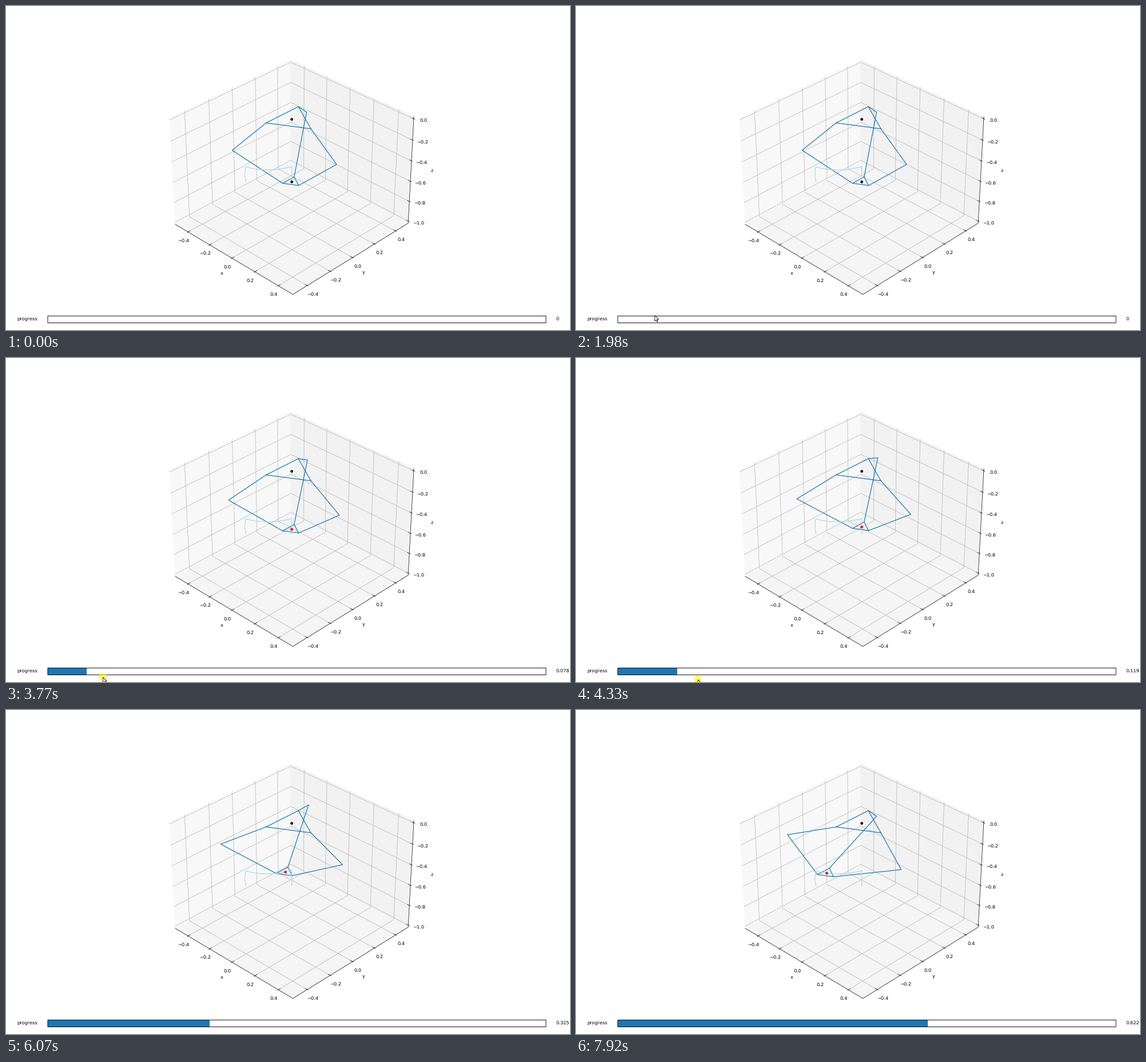
Write a matplotlib script that moves like this. It is 986 px wide and 568 px high and loops after 8 s.

```python
import numpy as np
import matplotlib.pyplot as plt
from matplotlib.animation import FuncAnimation
from matplotlib.patches import Circle, Polygon, Rectangle

W, H, DPI = 986, 568, 64
STEP, LOOP = 40, 8000
BLUE, GRID, DARK, RED = "#1f77b4", "#b0b0b0", "#170408", "#d81c1c"
PT = 72 / DPI          # points per pixel
THIN, THICK, FONT = 0.68 * PT, 1.24 * PT, 8.3 * PT

plt.rcParams["font.family"] = "DejaVu Sans"
plt.rcParams["text.hinting"] = "none"

fig = plt.figure(figsize=(W / DPI, H / DPI), dpi=DPI, facecolor="white")
ax = fig.add_axes([0, 0, 1, 1])
ax.set_xlim(0, W)
ax.set_ylim(H, 0)
ax.axis("off")

# ---- camera ----
AZIM, ELEV = np.radians([-45.5, 32.35])
BOX = np.array([8 / 7, 8 / 7, 6 / 7])
CENTRE = np.array([0, 0, -0.5])
ORIGIN_X, ORIGIN_Y, ZOOM, DIST = 499.6, 290.5, 2477, 10


def project(points):
    """Stage pixels of world points, one point per row."""
    x, y, z = ((np.asarray(points, float) - CENTRE) * BOX).T
    right = -np.sin(AZIM) * x + np.cos(AZIM) * y
    near = np.cos(AZIM) * x + np.sin(AZIM) * y
    up = z * np.cos(ELEV) - near * np.sin(ELEV)
    depth = DIST - near * np.cos(ELEV) - z * np.sin(ELEV)
    return np.column_stack([ORIGIN_X + ZOOM * right / depth,
                            ORIGIN_Y - ZOOM * up / depth])


def line3d(points, color, width, **style):
    return ax.plot(*project(points).T, color=color, lw=width, **style)[0]


def label(x, y, text, ha="center"):
    return ax.text(x, y, text, ha=ha, va="center", size=FONT, color="black", zorder=6)


# ---- box with grid, ticks and labels ----
PAD = 1 / 48
LO, HI = -0.5 - PAD, 0.5 + PAD
BOTTOM, TOP = -1 - PAD, PAD
TICK_IN, TICK_OUT = 1 / 60, 1 / 120


def draw_pane(corner, side_a, side_b, shade):
    a, b, c = np.array(corner), np.array(side_a), np.array(side_b)
    ax.add_patch(Polygon(project([a, b, b + c - a, c]), fc=shade, ec=shade, lw=THIN, zorder=0))


def draw_tick(edge, inward, offset, value):
    edge, inward = np.array(edge), np.array(inward)
    line3d([edge + TICK_IN * inward, edge - TICK_OUT * inward], "black", THIN, zorder=2)
    x, y = project([edge])[0] + offset
    label(x, y, f"{value:.1f}".replace("-", "\u2212"))


def draw_box():
    back, left, right = (LO, HI, BOTTOM), (LO, LO, BOTTOM), (HI, HI, BOTTOM)
    back_top = (LO, HI, TOP)
    draw_pane(back, left, back_top, "#f8f8f8")
    draw_pane(back, right, back_top, "#f2f2f2")
    draw_pane(back, left, right, "#f5f5f5")

    for v in np.linspace(-0.4, 0.4, 5).round(1) + 0.0:
        line3d([(v, LO, BOTTOM), (v, HI, BOTTOM), (v, HI, TOP)], GRID, THIN, zorder=1)
        line3d([(HI, v, BOTTOM), (LO, v, BOTTOM), (LO, v, TOP)], GRID, THIN, zorder=1)
        draw_tick((v, LO, BOTTOM), (0, 1, 0), (-8, 16.4), v)
        draw_tick((HI, v, BOTTOM), (-1, 0, 0), (9.4, 16.4), v)
    for v in np.linspace(-1, 0, 6).round(1):
        line3d([(LO, LO, v), (LO, HI, v), (HI, HI, v)], GRID, THIN, zorder=1)
        draw_tick((HI, HI, v), (-1, 0, 0), (17.5, 4.3), v)

    line3d([left, (HI, LO, BOTTOM), right, (HI, HI, TOP)], "black", THIN, zorder=2)
    label(377, 468.5, "x")
    label(625.5, 467.5, "y")
    label(745, 289, "z")


# ---- delta robot ----
BASE_R, TOOL_R, UPPER, LOWER = 0.16, 0.059, 0.3, 0.5
ARM_ANGLES = np.radians([0, 120, 240])
ARM_DIRS = np.column_stack([np.cos(ARM_ANGLES), np.sin(ARM_ANGLES), np.zeros(3)])
DOWN = np.array([0, 0, -1])


def joint_angles(pos):
    along = ARM_DIRS @ pos
    side2 = pos[0] ** 2 + pos[1] ** 2 - along ** 2
    gap, drop = BASE_R - TOOL_R - along, -pos[2]
    k = (gap ** 2 + side2 + drop ** 2 + UPPER ** 2 - LOWER ** 2) / (2 * UPPER)
    return np.arctan2(gap, drop) + np.arcsin(k / np.hypot(gap, drop))


def upper_arms(theta):
    return UPPER * (np.cos(theta)[:, None] * ARM_DIRS + np.sin(theta)[:, None] * DOWN)


def tool_position(theta):
    """Lower meeting point of three spheres around the shifted elbows."""
    c = (BASE_R - TOOL_R) * ARM_DIRS + upper_arms(theta)
    diff = 2 * (c[1:] - c[0])
    rhs = (c[1:] ** 2).sum(1) - (c[0] ** 2).sum()
    p = np.append(np.linalg.solve(diff[:, :2], rhs), 0)
    d = np.append(np.linalg.solve(diff[:, :2], -diff[:, 2]), 1)
    r = p - c[0]
    qa, qb, qc = d @ d, 2 * d @ r, r @ r - LOWER ** 2
    return p + d * (-qb - np.sqrt(qb ** 2 - 4 * qa * qc)) / (2 * qa)


# pick, lift, carry and place: joints turn evenly between the stops
PICK, PLACE, LIFT = np.array([0, 0, -0.6]), np.array([-0.2, -0.2, -0.6]), np.array([0, 0, 0.15])
STOPS = np.array([PICK, PICK + LIFT, PLACE + LIFT, PLACE])
STOP_JOINTS = np.array([joint_angles(s) for s in STOPS])
LENGTHS = np.linalg.norm(np.diff(STOPS, axis=0), axis=1)
STOP_AT = np.append(0, np.cumsum(LENGTHS)) / LENGTHS.sum()


def joints_at(progress):
    return np.array([np.interp(progress, STOP_AT, j) for j in STOP_JOINTS.T])


draw_box()
base = BASE_R * ARM_DIRS
arms = [line3d(base[:2], BLUE, THICK, zorder=3) for _ in range(3)]
line3d(base[[0, 1, 2, 0]], BLUE, THICK, zorder=3)
tool = line3d(base[[0, 1, 2, 0]], BLUE, THICK, zorder=3)
ax.add_patch(Circle(project([(0, 0, 0)])[0], 2.4, fc=DARK, lw=0, zorder=4))
tool_dot = ax.add_patch(Circle((0, 0), 2.4, lw=0, zorder=4))
samples = np.union1d(np.linspace(0, 1, 80), STOP_AT)
line3d([tool_position(joints_at(s)) for s in samples], "lightblue", THICK, zorder=3.5)

# ---- slider ----
BAR_X, BAR_Y, BAR_W, BAR_H = 73, 543.4, 871, 12.1
bar = ax.add_patch(Rectangle((BAR_X, BAR_Y), 0, BAR_H, fc=BLUE, lw=0, zorder=3))
ax.add_patch(Rectangle((BAR_X, BAR_Y), BAR_W, BAR_H, fc="none", ec="black",
                       lw=0.9 * PT, snap=False, zorder=4))
label(55.2, 549.4, "progress", ha="right")
readout = label(961.5, 549.4, "0", ha="left")

# the slider follows the drag in coarse, even ticks
TICK, TICK_ZERO = 231, 3745
KEY_TICKS, KEY_VALUES = [-4, 0, 5, 10, 18], [0, 0.078, 0.18, 0.325, 0.622]


def progress_at(t):
    return round(float(np.interp((t - TICK_ZERO) // TICK, KEY_TICKS, KEY_VALUES)), 3)


# ---- pointer ----
ARROW = np.array([(0, 0), (0, 10), (2.3, 7.8), (4, 11.4), (5.4, 10.8), (3.8, 7.2), (6.8, 7.2)])
glow = ax.add_patch(Circle((0, 0), 7.3, fc="yellow", alpha=0.58, lw=0, zorder=7))
arrow = ax.add_patch(Polygon(ARROW, fc="white", ec="black", lw=0.8 * PT, zorder=8))
SHOWN, PRESS, GONE = 260, 2400, 5830
LEG_TIMES = [520, 1080, 1350, 2100, PRESS]
LEG_ENDS = np.array([(863, 553), (548.5, 367.5), (554, 356), (112, 554), (85.5, 551)])


def pointer_at(t):
    if t >= PRESS:                       # slow, speeding drag along a slight slope
        s = t / 1000 - 2.86
        shift = 56.2 * s + 8.94 * s ** 2
        return np.array([109.5 + shift, 553.5 + 0.1 * shift])
    leg, u = divmod(np.interp(t, LEG_TIMES, range(len(LEG_TIMES))), 1)
    start, end = LEG_ENDS[int(leg)], LEG_ENDS[int(leg) + 1]
    return start + (end - start) * u * u * (3 - 2 * u)


def pose_robot(progress):
    theta = joints_at(progress)
    pos = tool_position(theta)
    elbows = base + upper_arms(theta)
    corners = pos + TOOL_R * ARM_DIRS
    for arm, *chain in zip(arms, base, elbows, corners):
        arm.set_data(*project(chain).T)
    tool.set_data(*project(corners[[0, 1, 2, 0]]).T)
    tool_dot.center = project([pos])[0]
    tool_dot.set_facecolor(RED if progress else DARK)


def pose_pointer(t):
    tip = pointer_at(t)
    arrow.set_xy(ARROW + tip)
    glow.center = tip
    arrow.set_visible(SHOWN <= t < GONE)
    glow.set_visible(PRESS <= t < GONE)


def draw(i):
    t = i * STEP + 30
    progress = progress_at(t)
    pose_robot(progress)
    bar.set_width(BAR_W * progress)
    readout.set_text(f"{progress:.3g}")
    pose_pointer(t)
    return [*arms, tool, tool_dot, bar, readout, arrow, glow]


anim = FuncAnimation(fig, draw, frames=LOOP // STEP, interval=STEP, repeat=True,
                     repeat_delay=0, blit=False)
plt.show()
```
